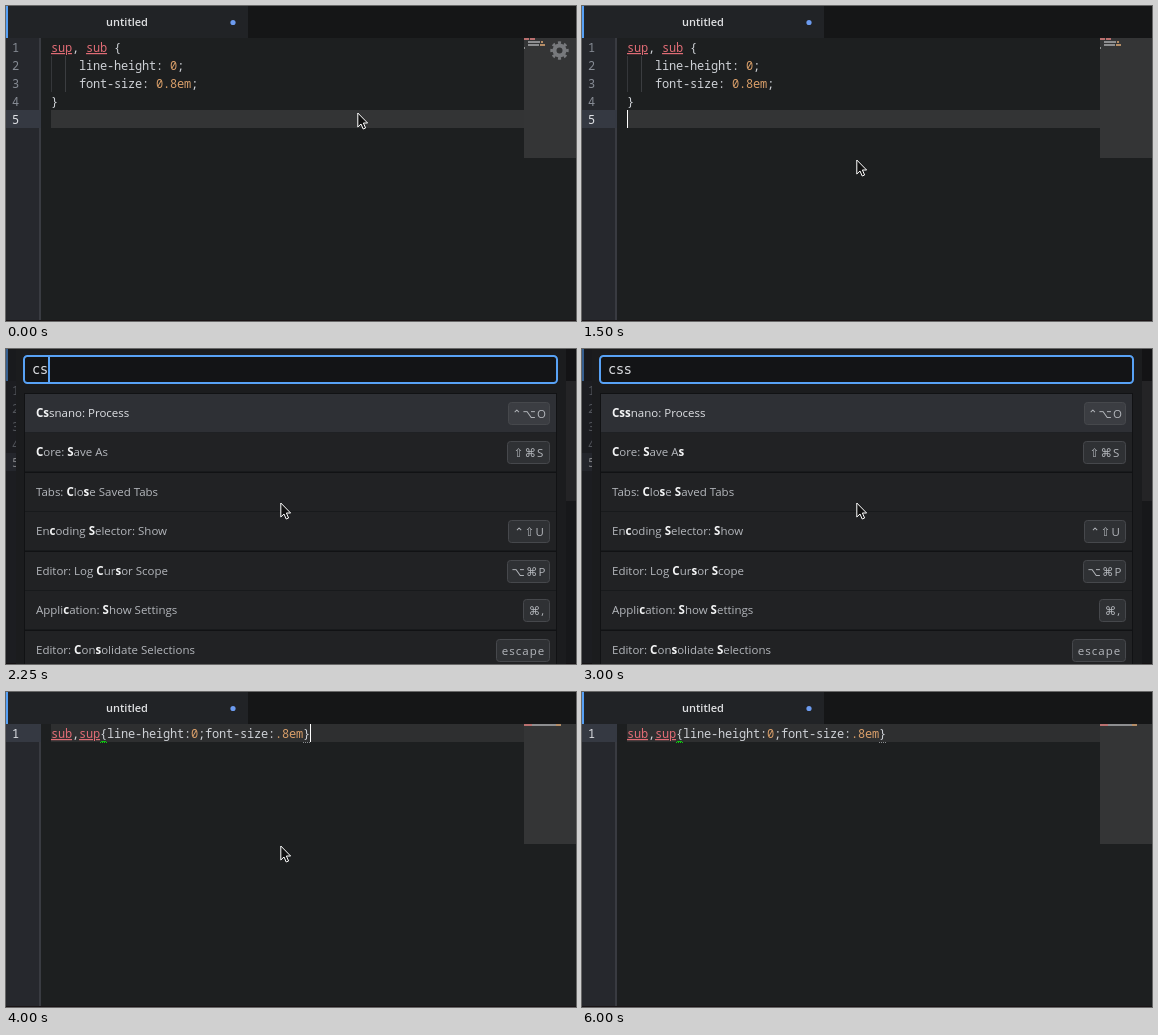
Recreate the animation shown at these times as an HTML page. Size 570 by 315 pixels, loop 6.5 s.

```html
<!DOCTYPE html>
<html lang="en">
<head>
<meta charset="utf-8">
<title>Minify from the command palette</title>
<style>
  html, body { margin: 0; width: 100%; height: 100%; overflow: hidden; background: #1d1f20; }
  svg { display: block; width: 570px; height: 315px; }
  text { white-space: pre; font: 500 11.5px "Open Sans", "DejaVu Sans", sans-serif; fill: #b4b7bc; }
  .code { font: 12px "Noto Sans Mono", monospace; letter-spacing: -.2px; fill: #ced1d6; }
  .number { fill: #868b94; }
  .active { fill: #dfe1e5; }
  .tag { fill: #e06c75; text-decoration: underline; }
  .value { fill: #dba06a; }
  .title { font-size: 11px; font-weight: 600; fill: #e0e1e3; text-anchor: middle; }
  .match { font-weight: 700; fill: #f4f5f6; }
  .key { letter-spacing: 1px; text-anchor: middle; }
  .query { font: 13.5px "DejaVu Sans", sans-serif; letter-spacing: .6px; fill: #dcdee2; }
</style>
</head>
<body>
<svg id="stage" viewBox="0 0 570 315"></svg>
<script>
const STEP = 250, LOOP = 6500;
const stage = document.getElementById("stage");

const pretty = ["sup, sub {", "    line-height: 0;", "    font-size: 0.8em;", "}", ""];
const minified = ["sub,sup{line-height:0;font-size:.8em}"];

// [label, shortcut, left edge of its badge]; * marks a matched letter
const allCommands = [
  ["Application: About"],
  ["Application: Add Project Folder", "⇧⌘O", 500],
  ["Application: Bring All Windows To Front"],
  ["Application: Hide", "⌘H", 512],
  ["Application: Hide Other Applications", "⌥⌘H", 500],
  ["Application: Install Update"],
  ["Application: Minimize", "⌘M", 510],
];
const foundCommands = [
  ["*C*s*snano: Process", "⌃⌥O", 502],
  ["*Core: *Save A*s", "⇧⌘S", 501],
  ["Tabs: *Clo*se *Saved Tabs"],
  ["En*coding *Selector: *Show", "⌃⇧U", 502],
  ["Editor: Log *Cur*sor *Scope", "⌥⌘P", 501],
  ["Appli*cation: *Show *Settings", "⌘,", 517],
  ["Editor: *Con*solidate *Selections", "escape", 490],
];

const rect = (x, y, w, h, fill, extra = "") =>
  `<rect x="${x}" y="${y}" width="${w}" height="${h}" fill="${fill}" ${extra}/>`;
const text = (x, y, cls, body) => `<text x="${x}" y="${y}" class="${cls}">${body}</text>`;
const span = (cls, body) => `<tspan class="${cls}">${body}</tspan>`;

const highlight = line => line.replace(/su[pb]|\.?\d[\w.]*/g,
  token => span(token[0] === "s" ? "tag" : "value", token));

function emphasize(label, count) {
  let seen = 0;
  return label.replace(/\*(.)/g, (_, letter) => seen++ < count ? span("match", letter) : letter);
}

function minimap(isMinified) {
  const red = "#b9706f", grey = "#8d8e90", orange = "#b58d66";
  const bars = isMinified
    ? [[518, 32, 8, red], [526, 32, 24, grey], [550, 32, 5, orange]]
    : [[518, 32, 5, red], [524, 32, 5, red], [522, 35, 12, grey], [535, 35, 2, orange],
       [522, 38, 11, grey], [534, 38, 5, orange], [518, 41, 1, grey]];
  return rect(518, 32, 52, 120, "#343536") +
    bars.map(([x, y, w, fill]) => rect(x, y, w, 2, fill)).join("");
}

function editor(lines, caretOn) {
  const isMinified = lines === minified;
  const last = lines.length - 1, top = 32 + 18 * last;
  let out = rect(0, 0, 570, 315, "#1d1f20") +
    rect(0, 0, 570, 32, "#151617") + rect(0, 0, 242, 32, "#212326") + rect(0, 0, 2, 32, "#56a0f5") +
    text(121, 20, "title", "untitled") + `<circle cx="227" cy="16.5" r="2.6" fill="#6c9bef"/>` +
    rect(0, 32, 33, 283, "#26282d") + rect(33, 32, 2, 283, "#393b41") +
    rect(0, top, 35, 18, "#353942") + rect(45, top, 473, 18, isMinified ? "#2e2f30" : "#333435");
  if (!isMinified) out += rect(45, 50, 1, 36, "#35373a") + rect(59, 50, 1, 36, "#3b3d40");
  lines.forEach((line, i) => {
    const y = 46 + 18 * i;
    out += text(6, y, "code " + (i === last ? "active" : "number"), i + 1) +
      text(45, y, "code", highlight(line));
  });
  if (isMinified) {
    for (let x = 0; x < 7; x += 2)
      out += rect(94 + x, 50, 1, 1, "#10d010") + rect(297 + x, 50, 1, 1, "#8a8c90");
    out += rect(95, 49, 5, 1, "#10c010");
  }
  out += minimap(isMinified) + rect(0, 314, 570, 1, "#1a1416");
  if (caretOn) out += rect(45 + 7 * lines[last].length, top, 1, 18, "#fff");
  return out;
}

function palette(query, caretOn) {
  const matched = query.length > 1;
  let out = rect(0, 0, 570, 315, "#101113", 'opacity=".45"') + rect(10, 0, 550, 315, "#1b1c1e") +
    rect(18, 7, 533, 27, "#131416", 'rx="3.5" stroke="#58a2f6" stroke-width="2"') +
    text(26.5, 25, "query", query) +
    rect(18, 44, 533, 271, "#111214");
  if (caretOn) out += rect(26 + 8 * query.length, 8, 2, 25, "#5ba4f5");
  (matched ? foundCommands : allCommands).forEach(([label, keys, left], i) => {
    const y = Math.round(44.5 + 39.5 * i);
    out += rect(19, y, 531, 38.5, i ? "#212224" : "#2e3035") +
      text(30, y + 23, i ? "" : "active", emphasize(label, query.length));
    if (keys)
      out += rect(left + .5, y + 8.5, 543 - left, 22, i ? "#2f3134" : "#3b3d42",
        'rx="3" stroke="#46484c"') + text((left + 545) / 2, y + 24, "key", keys);
  });
  return out;
}

const gear = `<g transform="translate(553.5 44.5)" fill="none" stroke="#77797c">
  <circle r="5" stroke-width="4"/>
  <circle r="7.8" stroke-width="2.8" pathLength="16" stroke-dasharray="1" stroke-dashoffset=".5"/></g>`;

const pointer = (x, y) => `<path transform="translate(${x} ${y})" fill="#111" stroke="#fff"
  d="M.8 1V15l3.2-3 2.2 5 2.4-1-2.2-5H10.6z"/>`;

const pointerPath = [[351, 106], [311, 119], [274, 153]];
const caretSteps = new Set([3, 6, 13, 14, 16, 17, 19, 22, 23]);

function render(step) {
  const paletteStep = step - 7;
  const paletteOpen = paletteStep >= 0 && paletteStep < 6;
  let out = editor(step < 13 ? pretty : minified, caretSteps.has(step));
  if (paletteOpen) out += palette("css".slice(0, paletteStep), paletteStep < 5);
  if (step === 0) out += gear;
  if (step < 18) out += pointer(...pointerPath[Math.min(step, 2)]);
  stage.innerHTML = out;
}

let shown = -1;
function tick() {
  const step = Math.floor(performance.now() % LOOP / STEP);
  if (step !== shown) render(shown = step);
  requestAnimationFrame(tick);
}
tick();
</script>
</body>
</html>
```
